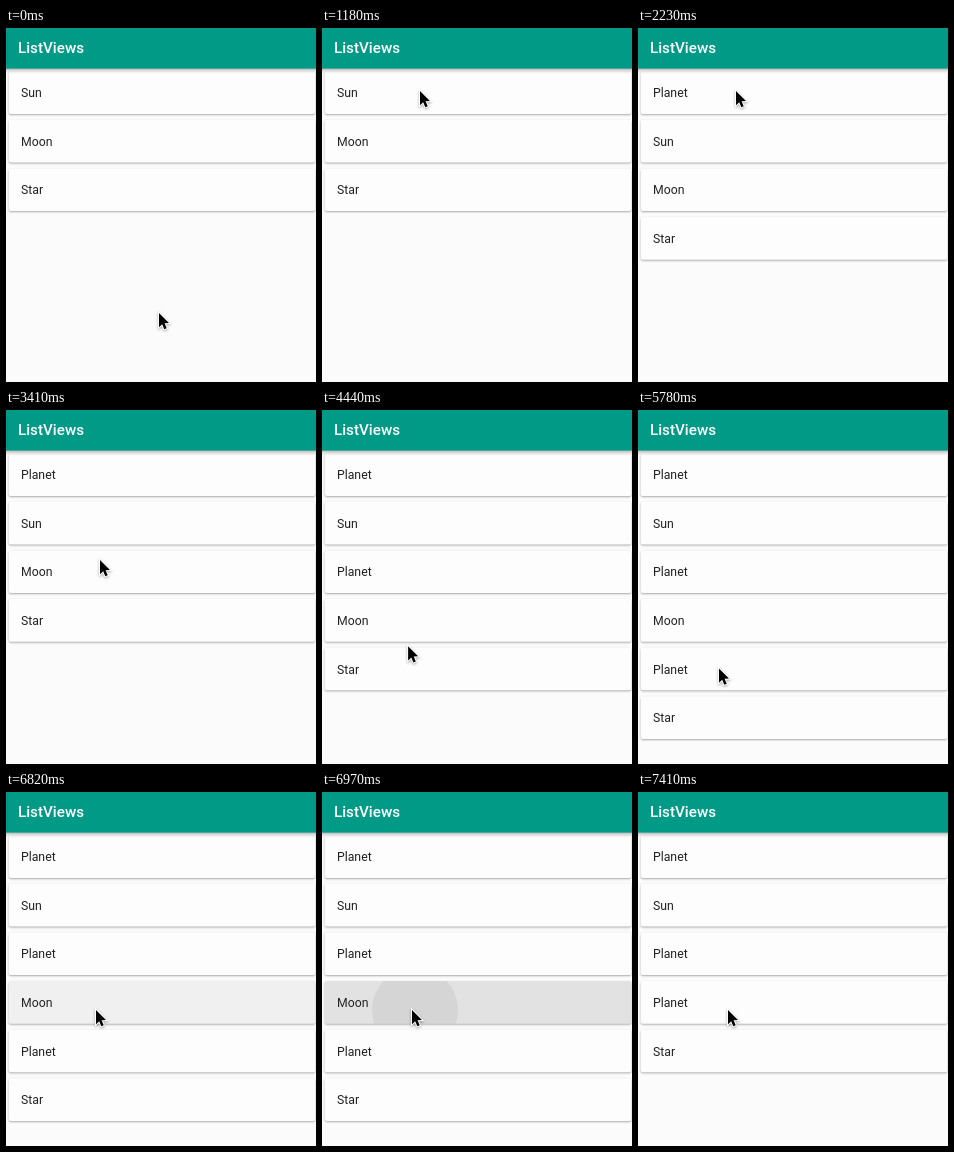
An HTML page with a canvas for the animation above (8 s loop, 310 by 354 pixels).

```html
<!DOCTYPE html>
<html lang="en">
<head>
<meta charset="utf-8">
<title>ListViews</title>
<style>
html, body { margin: 0; width: 100%; height: 100%; overflow: hidden; background: #fbfbfb; }
canvas { display: block; }
</style>
</head>
<body>
<canvas id="stage" width="310" height="354"></canvas>
<script>
const ctx = document.getElementById('stage').getContext('2d');
const LOOP = 8000, STEP = 145, PITCH = 48.6;

// list contents from a given time on
const lists = [
  [0, 'Sun Moon Star'],
  [2230, 'Planet Sun Moon Star'],
  [3850, 'Planet Sun Planet Moon Star'],
  [5030, 'Planet Sun Planet Moon Planet Star'],
  [7410, 'Planet Sun Planet Planet Star']
];

// pointer moves: start time, steps, target x, target y, bend of the path
const home = [153, 285];
const moves = [
  [150, 8, 98, 63, 0.5],
  [2830, 5, 94, 150, 1],
  [3995, 6, 80, 265, 2],
  [5780, 1, 81, 258.5, 1],
  [5925, 4, 90, 218, 1]
];

const press = { from: 6820, to: 7410, row: 3, x: 90, y: 218 };
const arrow = [[0, 0], [0, 14.2], [3.2, 11.2], [5.3, 16.2], [7.7, 15.2], [5.6, 10.3], [10, 10.1]];

function pointerAt(t) {
  let [x, y] = home;
  for (const [start, steps, tx, ty, bend] of moves) {
    if (t < start) break;
    const s = Math.min(1, (Math.floor((t - start) / STEP) + 1) / steps);
    const f = (1 - Math.cos(Math.PI * s)) / 2;
    x += (tx - x) * f ** bend;
    y += (ty - y) * f;
  }
  return [x, y];
}

function shadow(color, blur, dy) {
  ctx.shadowColor = color;
  ctx.shadowBlur = blur;
  ctx.shadowOffsetY = dy;
}

function text(label, x, y, font, color) {
  ctx.font = font + ' Roboto, sans-serif';
  ctx.fillStyle = color;
  ctx.fillText(label, x, y);
}

function drawRipple(t, top) {
  const k = Math.floor((t - press.from) / STEP);
  ctx.save();
  ctx.clip();
  ctx.fillStyle = `rgba(0,0,0,${k ? 0.105 : 0.05})`;
  ctx.fillRect(0, top, 310, PITCH);
  ctx.beginPath();
  ctx.arc(press.x + 3 * k, press.y, 43 * k ** 1.2, 0, 7);
  ctx.fillStyle = 'rgba(0,0,0,.06)';
  ctx.fill();
  ctx.restore();
}

function drawCard(label, i, t) {
  const top = 43.2 + i * PITCH;
  ctx.save();
  shadow('rgba(0,0,0,.32)', 2, 1);
  ctx.beginPath();
  ctx.roundRect(2.8, top, 306.5, 42.7, 2);
  ctx.fillStyle = '#fdfdfd';
  ctx.fill();
  shadow('transparent', 0, 0);
  if (i === press.row && t >= press.from && t < press.to) drawRipple(t, top);
  ctx.restore();
  text(label, 15, Math.round(69.2 + i * PITCH), '12.25px', '#212121');
}

function drawHeader() {
  const g = ctx.createLinearGradient(0, 40, 0, 46);
  g.addColorStop(0, 'rgba(0,0,0,.3)');
  g.addColorStop(0.5, 'rgba(0,0,0,.09)');
  g.addColorStop(1, 'rgba(0,0,0,0)');
  ctx.fillStyle = g;
  ctx.fillRect(0, 40, 310, 6);
  ctx.fillStyle = '#009a87';
  ctx.fillRect(0, 0, 310, 40.6);
  text('ListViews', 12, 25, '500 15.2px', '#fff');
}

function drawPointer(x, y) {
  ctx.save();
  ctx.translate(x, y);
  ctx.beginPath();
  arrow.forEach(p => ctx.lineTo(...p));
  ctx.closePath();
  shadow('rgba(0,0,0,.35)', 2.5, 1);
  ctx.strokeStyle = '#fff';
  ctx.lineWidth = 2;
  ctx.stroke();
  shadow('transparent', 0, 0);
  ctx.fillStyle = '#000';
  ctx.fill();
  ctx.restore();
}

function draw(now) {
  const t = now % LOOP;
  ctx.fillStyle = '#fbfbfb';
  ctx.fillRect(0, 0, 310, 354);
  const items = lists.filter(([at]) => t >= at).pop()[1].split(' ');
  items.forEach((label, i) => drawCard(label, i, t));
  drawHeader();
  drawPointer(...pointerAt(t));
}

let begin;
function frame(now) {
  begin ??= now;
  draw(now - begin);
  requestAnimationFrame(frame);
}
requestAnimationFrame(frame);
</script>
</body>
</html>
```
